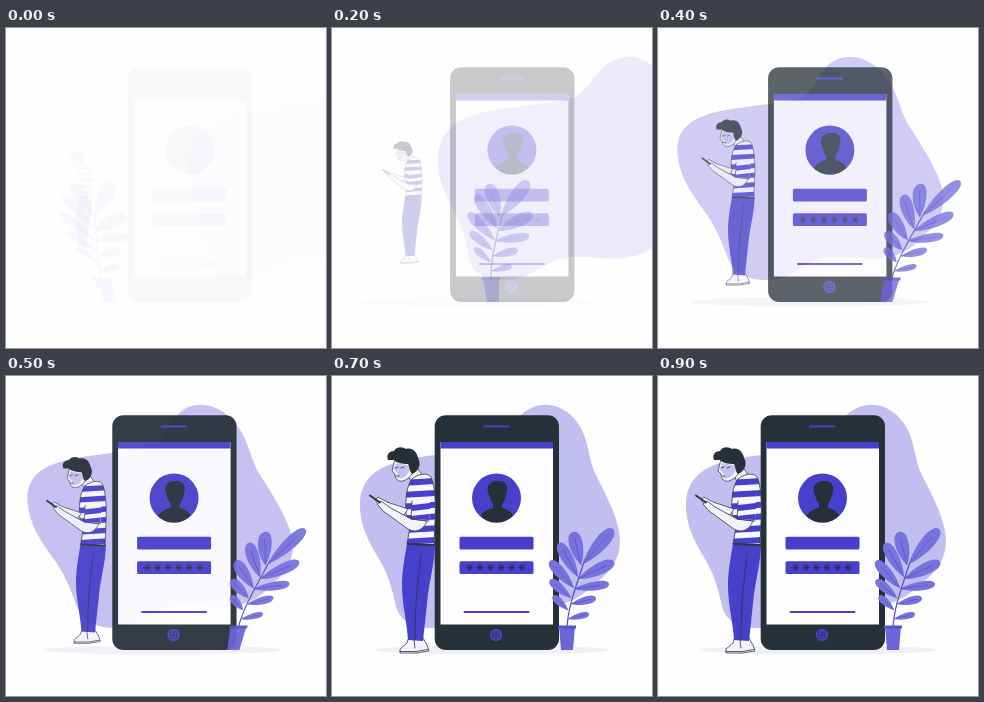
Write an HTML page that moves like this. It is 320x320 px and loops after 1 s.

```html
<!DOCTYPE html>
<html lang="en">
<head>
<meta charset="utf-8">
<title>Login illustration</title>
<style>
  html, body { margin: 0; width: 100%; height: 100%; overflow: hidden; background: #fefefe; }
  svg { display: block; width: 100vw; height: 100vh; }
  .ink { fill: #263038; }
  .blue { fill: #4740ca; }
  .bar { fill: none; stroke: #4740ca; stroke-width: 2; stroke-linecap: round; }
  .skin { fill: #f4f3fd; stroke: #3a4050; stroke-width: .8; stroke-linejoin: round; }
  .line { fill: none; stroke: #30353f; stroke-width: .8; stroke-linecap: round; }
  .leaf { fill: #7872dd; }
  .vein { fill: none; stroke: #5a53c8; stroke-width: .7; }
</style>
</head>
<body>
<svg viewBox="0 0 320 320">
  <defs>
    <clipPath id="face"><circle cx="164.5" cy="122" r="24.5"/></clipPath>
    <clipPath id="torso"><path id="shirt" d="M80 103C86 98 95 96 99 101C103 109 104 127 103 146L102 169L75 168L78 151L74 137C73 122 75 109 80 103Z"/></clipPath>
  </defs>

  <ellipse id="shadow" cx="160" cy="274" rx="118" ry="4.5" fill="#efeff6"/>

  <path id="blob" fill="#c3bef0" d="M28 126C29 107 40 96 54 90C82 78 124 79 158 70C174 65 177 49 191 37C207 24 230 26 245 46C258 64 256 84 264 99C271 113 288 144 288 164C288 181 281 192 270 202C258 211 253 219 238 225C216 235 194 228 168 229C143 230 130 250 104 252C82 253 68 246 64 230C60 212 56 198 47 183C36 165 27 148 28 126Z"/>

  <g id="phone">
    <rect class="ink" x="102.7" y="39.200" width="124.300" height="234.800" rx="11"/>
    <rect x="108.500" y="66" width="112.500" height="182.500" fill="#fdfdff"/>
    <rect class="blue" x="108.500" y="66" width="112.500" height="6.500"/>
    <path class="bar" d="M152 50.500H176.500M132.500 236H196.500"/>
    <circle class="blue" cx="164" cy="259" r="6.200"/>
    <path class="line" d="M161 256h6v6h-6zM164 256v6M161 259h6"/>
    <circle class="blue" cx="164.500" cy="122" r="24.500"/>
    <path class="ink" clip-path="url(#face)" d="M157 119C153 111 158 104 166 105C174 104 177 110 174 119C173 124 171 127 170 128V132C178 134 182 137 183 148H147C147 138 152 134 161 132V128C159 126 158 123 157 119Z"/>
    <rect class="blue" x="127.500" y="160.800" width="74" height="12.800" rx="1.500"/>
    <rect class="blue" x="127.500" y="185.200" width="74" height="12.800" rx="1.500"/>
    <g id="stars" stroke="#2b2f55" stroke-width="1.300"></g>
  </g>

  <g id="person">
    <path class="skin" d="M76 263L75 267L68 273V277H84L97 275L95 269L91 262Z"/>
    <path class="line" d="M68 275.500H84L96 273.500M82 264L83 272"/>
    <path class="blue" d="M75 167H103C103 184 99 198 96 218L91 265L76 264C75 246 70 228 70 210C70 193 73 181 75 167Z"/>
    <path class="line" d="M89 178C87 200 83 220 83 264" stroke="#2f2a91"/>
    <path class="skin" d="M75 94L78 104C82 108 87 106 91 100L84 90Z"/>
    <path class="skin" d="M63 83L60 95L63 98C63 103 66 106 71 105C77 103 81 98 83 92L80 81Z"/>
    <path fill="#c6c2f0" d="M64 87L62 94L66 98L65 102C71 104 77 99 79 90Z"/>
    <path class="ink" d="M56 84C54 79 57 75 62 75C65 70 71 71 74 73C80 71 85 76 86 82C90 88 86 96 80 98C77 95 78 91 76 88C70 88 65 87 62 84Z"/>
    <path class="line" d="M63 92L66 91M69 92L72 91M64 100L67 100"/>
    <use href="#shirt" fill="#f8f7ff"/>
    <g id="stripes" clip-path="url(#torso)" stroke="#4740ca" stroke-width="6"></g>
    <use href="#shirt" class="line"/>
    <path class="line" d="M76 168L102 169" style="stroke-width:2"/>
    <path class="skin" d="M76 133L55 126L46 121L43 124L48 130L72 139Z"/>
    <path class="skin" d="M79 143L57 131L49 125L45 128L51 135L76 153C83 157 91 155 95 145Z"/>
    <path d="M80 125L98 123L97 145L79 143Z" fill="#f8f7ff"/>
    <path class="blue" d="M80 129L98 127V133L80 135ZM79 140L97 138V144L79 143Z"/>
    <path class="line" d="M80 125L79 143L97 145"/>
    <path class="line" d="M38 119.500L48 126.500" style="stroke-width:2"/>
  </g>

  <g id="plant">
    <path class="vein" style="stroke-width:1.300" d="M235 252C236 230 245 208 253 183"/>
    <g id="leaves"></g>
    <path fill="#6c64d8" d="M227 250H243L241 274H229Z"/>
    <path fill="#5951c8" d="M226 249.500H244V252.500H226Z"/>
  </g>
</svg>
<script>
const $ = id => document.getElementById(id);

// base x, base y, tip x, tip y, half width
const leaves = [
  [249, 189, 241, 156, 7.5], [251, 188, 281, 153, 7.5], [246, 203, 282, 186, 6.5],
  [242, 213, 277, 208, 5], [239, 228, 264, 222, 4.500], [236, 243, 257, 238, 3.500],
  [246, 201, 227, 167, 6.5], [242, 212, 218, 185, 6], [239, 222, 218, 204, 5],
  [236, 234, 221, 220, 4]
];
$("leaves").innerHTML = leaves.map(([x, y, tx, ty, w]) => {
  const l = Math.hypot(tx - x, ty - y), a = Math.atan2(ty - y, tx - x) * 180 / Math.PI;
  return `<g transform="translate(${x} ${y}) rotate(${a})">
    <path class="leaf" d="M0 0C${l * .3} ${-w} ${l} ${-w * 1.4} ${l} 0C${l} ${w * 1.4} ${l * .3} ${w} 0 0Z"/>
    <path class="vein" d="M0 0H${l * .8}"/></g>`;
}).join("");

const repeat = (n, draw) => Array.from({ length: n }, (_, i) => draw(i)).join("");
$("stars").innerHTML = repeat(6, i =>
  `<path transform="translate(${137.5 + i * 10.5} 191.6)" d="M-3.200 0H3.200M-1.600 -2.800L1.600 2.800M1.600 -2.800L-1.600 2.800"/>`);
$("stripes").innerHTML = repeat(6, i => `<path d="M70 ${107 + i * 11.8}L106 ${105 + i * 11.8}"/>`);

const FRAME = 100, LOOP = 1000;
const ease = p => (1 - Math.cos(Math.PI * Math.min(p, 1))) / 2;
const at = (track, i) => track[Math.min(i, track.length - 1)];

// overshooting moves, one value per step
const blobX = [155, 125, 78, 13, -8, -6, -2, 0];
const plantX = [-135, -115, -75, -20, -4, -5, -2, 0];
const lean = [-20, -12, -5, 7, 13, 12, 5, 0];

function place(id, transform, opacity) {
  $(id).setAttribute("transform", transform);
  $(id).setAttribute("opacity", opacity);
}

// shift by x, leaning by an angle about the height y
const sway = (x, angle, y) => `translate(${x} ${y}) skewX(${angle}) translate(0 ${-y})`;

function draw(now) {
  const step = Math.floor(now % LOOP / FRAME), t = step * FRAME;
  const move = ease(t / 700), fade = Math.max(.025, ease(t / 600)), soft = fade ** .85;
  const slide = 19 * (1 - move), size = .5 + .5 * move, tilt = at(lean, step);
  place("shadow", `translate(${-slide} 0)`, fade);
  place("blob", sway(at(blobX, step), tilt * .6, 130), soft);
  place("phone", `translate(${slide} 0)`, fade);
  place("person", `translate(70 174.5) scale(${size}) translate(-70 -174.5)`, fade);
  place("plant", sway(at(plantX, step), -tilt, 262), soft);
}

const start = performance.now();
function tick() {
  draw(performance.now() - start);
  requestAnimationFrame(tick);
}
tick();
</script>
</body>
</html>
```
